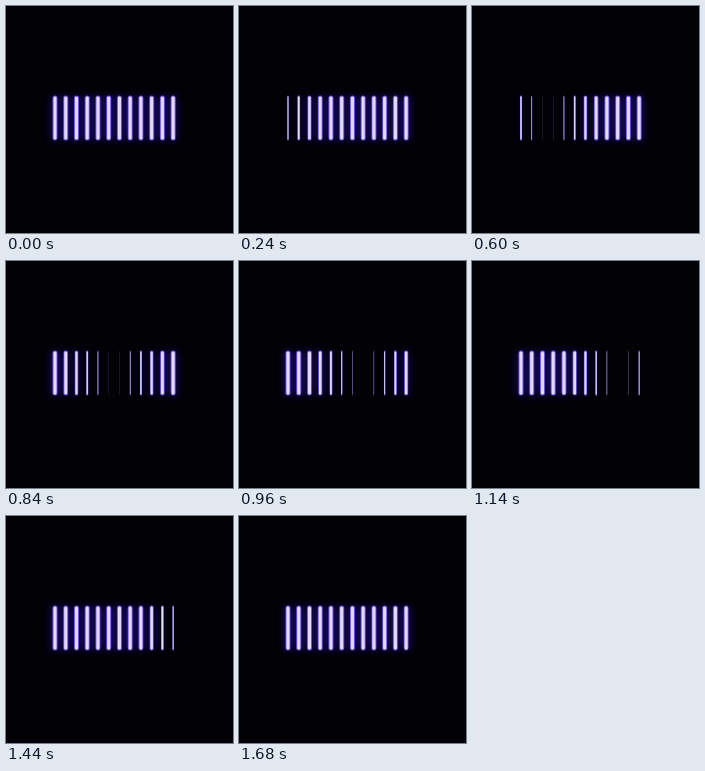
An HTML page with a canvas for the animation above (1.74 s loop, 227 px wide and 227 px high).

```html
<!DOCTYPE html>
<html lang="en">
<head>
<meta charset="utf-8">
<title>Light bars</title>
<style>
  html, body { margin: 0; width: 100%; height: 100%; overflow: hidden; background: #020105; }
  canvas { display: block; width: 100vw; height: 100vh; }
</style>
</head>
<body>
<canvas width="227" height="227"></canvas>
<script>
const ctx = document.querySelector('canvas').getContext('2d');
const LOOP = 1740, STEP = 60;
const COUNT = 12, FIRST_X = 49, GAP = 10.74, TOP = 89.5, HEIGHT = 45, WIDTH = 5;

// Each bar narrows to nothing and opens again, 80 ms after its left neighbour.
function openness(index, time) {
  const distance = Math.min(Math.abs(time - 400 - index * 80) / 450, 1);
  return 0.5 - 0.5 * Math.cos(Math.PI * distance);
}

function bar(x, width, inset, color) {
  ctx.fillStyle = color;
  ctx.beginPath();
  ctx.roundRect(x - width / 2, TOP + inset, width, HEIGHT - 2 * inset, width / 2);
  ctx.fill();
}

function draw(time) {
  ctx.fillStyle = '#020105';
  ctx.fillRect(0, 0, 227, 227);
  for (let i = 0; i < COUNT; i++) {
    const open = openness(i, time);
    const x = FIRST_X + i * GAP;
    const width = WIDTH * open;
    if (width < 0.05) continue;
    ctx.shadowColor = `rgba(60, 30, 255, ${0.6 * open})`;
    ctx.shadowBlur = 9;
    bar(x, width, 0, '#6f55dc');
    ctx.shadowBlur = 0;
    bar(x, width * 0.62, 1, '#e6dcff');
  }
}

function frame(now) {
  draw(Math.floor((now % LOOP) / STEP) * STEP);
  requestAnimationFrame(frame);
}
requestAnimationFrame(frame);
</script>
</body>
</html>
```
